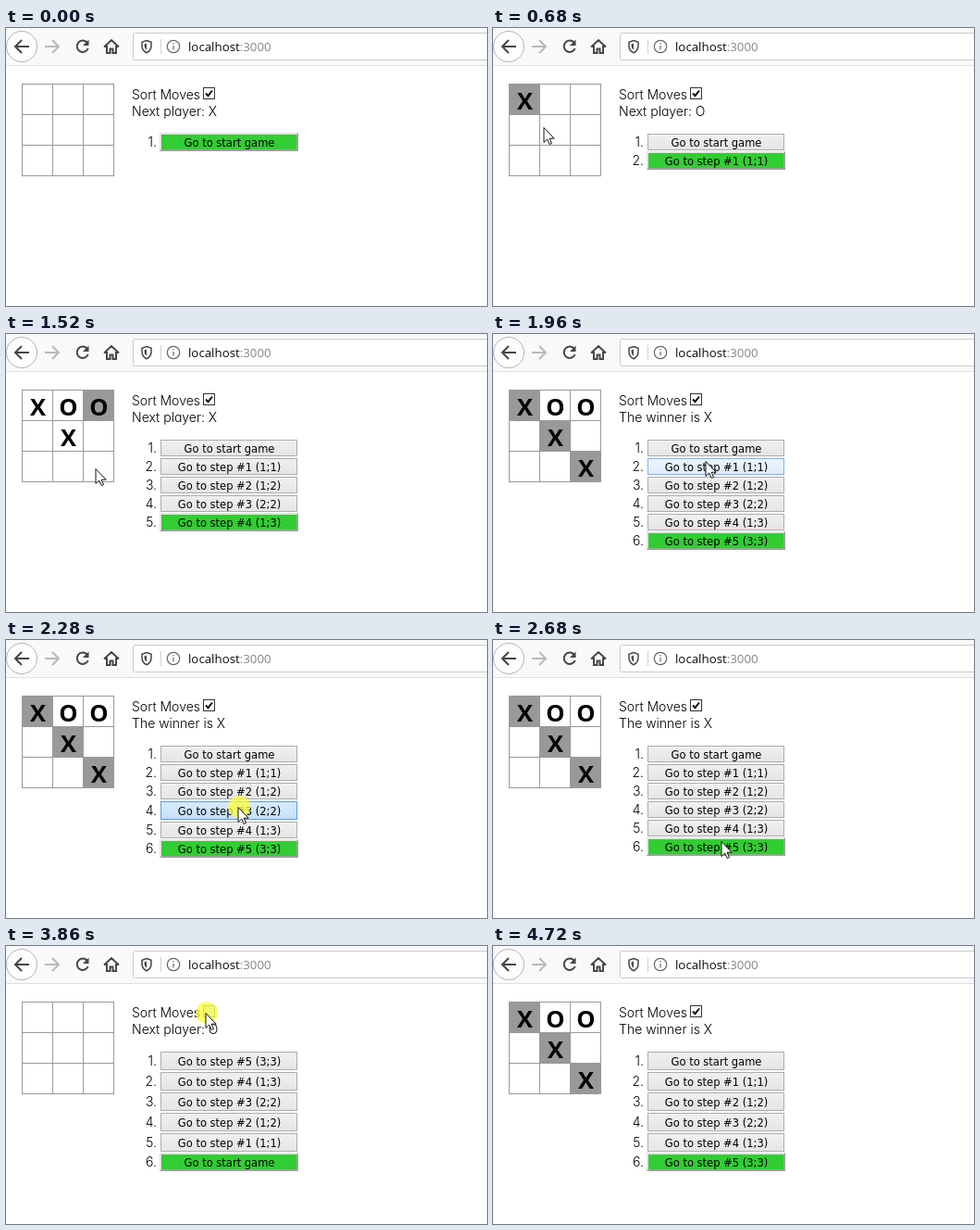
Recreate the animation shown at these times as an HTML page. Size 520 by 300 pixels, loop 4760 ms.

```html
<!DOCTYPE html>
<html lang="en">
<head>
<meta charset="utf-8">
<title>Tic-tac-toe</title>
<style>
  html, body { margin: 0; width: 100%; height: 100%; overflow: hidden; background: #fff; }
  svg { display: block; width: 520px; height: 300px; }
  .url { font: 13.3px "Open Sans", sans-serif; }
  .label { font: 300 14px Inter, sans-serif; font-feature-settings: "cv11"; }
  .button { font: 11.5px "DejaVu Sans", sans-serif; text-anchor: middle; }
  .mark { font: bold 25.5px "Open Sans", sans-serif; text-anchor: middle; }
  .icon { fill: none; stroke: #45454a; stroke-width: 2; }
  .icon .solid { fill: #45454a; stroke: none; }
  .icon .thin { stroke: #66666a; stroke-width: 1.2; }
</style>
</head>
<body>
<svg viewBox="0 0 520 300">
  <defs>
    <linearGradient id="plain" x2="0" y2="1"><stop stop-color="#f0f0f0"/><stop offset="1" stop-color="#e5e5e5"/></linearGradient>
    <linearGradient id="hover" x2="0" y2="1"><stop stop-color="#ecf4fc"/><stop offset="1" stop-color="#dcecfc"/></linearGradient>
    <linearGradient id="press" x2="0" y2="1"><stop stop-color="#daecfc"/><stop offset="1" stop-color="#c4e0fc"/></linearGradient>
  </defs>

  <rect width="520" height="40" fill="#f9f9fa"/>
  <path d="M0 40.5H520" stroke="#e0e0e2"/>
  <circle cx="17" cy="20" r="16.5" fill="#fdfdfd" stroke="#b4b4b7"/>
  <g class="icon">
    <path d="M25 20H10.5M17 13L10 20L17 27"/>
    <path d="M42 20H56.5M50 13L57 20L50 27" stroke="#b9b9bc"/>
    <path d="M87.5 15.5A6.2 6.2 0 1 0 88.7 22"/>
    <path class="solid" d="M89.5 12.5V19H83Z"/>
    <path d="M106 20.5L114 13L122 20.5M109 19V27H112.5V22.5H115.5V27H119V19"/>
  </g>
  <rect x="137.5" y="5.500" width="390" height="29" rx="2" fill="#fff" stroke="#cacacd"/>
  <g class="icon">
    <path d="M152 13.5L157 15.2V19C157 23 155 25.3 152 26.7C149 25.3 147 23 147 19V15.2Z" stroke-width="1.5"/>
    <path class="solid" d="M152 16.5V23.5C150 22.2 149.5 20.5 149.5 17.4Z"/>
    <path d="M167.5 12V28" style="stroke:#d0d0d3;stroke-width:1"/>
    <circle class="thin" cx="181" cy="20" r="6.7"/>
    <path class="thin" d="M181 19V23.5M181 16V17.5"/>
  </g>
  <text class="url" x="197" y="25" fill="#0c0c0d">localhost<tspan fill="#858588">:3000</tspan></text>

  <g id="page"></g>
  <g id="pointer">
    <circle id="halo" cx="1" r="12" fill="#ffff30" opacity=".72"/>
    <path d="M0 .5V16.5L3.7 13L6.2 18.5L8.500 17.5L6.1 12.2H11.2Z" fill="#fff" stroke="#111"/>
  </g>
</svg>

<script>
const LOOP = 4760, TICK = 20;
const HALO = 70, REACTION = 40;       // ms after a click begins
const CELL = 33, BOARD = { x: 17, y: 60 }, LIST_Y = 113;
const BOX = { x: 213, y: 64, size: 13 };

// Where the pointer goes, when it gets there and when it clicks.
// bow bends the way vertically.
const STOPS = [
  { arrive: 40, travel: 0, x: 353, y: 273 },
  { arrive: 380, travel: 340, click: 440, x: 28, y: 80, bow: -20 },
  { arrive: 800, travel: 220, click: 860, x: 66, y: 85, bow: 28 },
  { arrive: 1060, travel: 140, click: 1120, x: 66, y: 115 },
  { arrive: 1320, travel: 140, click: 1360, x: 100, y: 85 },
  { arrive: 1520, travel: 100, click: 1580, x: 97, y: 145 },
  { arrive: 2100, travel: 380, click: 2280, x: 251, y: 180, bow: -82 },
  { arrive: 2460, travel: 120, click: 2520, x: 247, y: 217 },
  { arrive: 3140, travel: 460, click: 3340, x: 216, y: 72, bow: -70 },
  { arrive: 3340, travel: 0, click: 3860, x: 216, y: 72 },
  { arrive: 4440, travel: 260, x: 437, y: 300 }
];
const CLICKS = STOPS.filter(s => s.click);

const page = document.getElementById("page");
const pointer = document.getElementById("pointer");
const halo = document.getElementById("halo");

const text = (cls, x, y, str, extra = "") =>
  `<text class="${cls}" x="${x}" y="${y}" ${extra}>${str}</text>`;
const rect = (x, y, w, h, fill, stroke = "none") =>
  `<rect x="${x}" y="${y}" width="${w}" height="${h}" fill="${fill}" stroke="${stroke}"/>`;
const inside = (p, x, y, w, h) =>
  p && p.x >= x && p.x < x + w && p.y >= y && p.y < y + h;

const onBoard = p => inside(p, BOARD.x, BOARD.y, 3 * CELL, 3 * CELL);
const onBox = p => inside(p, BOX.x, BOX.y, BOX.size, BOX.size);

// Replays all clicks up to t; what a click does follows from its place.
function gameAt(t) {
  const game = { moves: [], step: 0, sorted: true, tall: false };
  for (const c of CLICKS.filter(c => t >= c.click + REACTION)) {
    if (onBoard(c)) {
      const column = Math.floor((c.x - BOARD.x) / CELL);
      const row = Math.floor((c.y - BOARD.y) / CELL);
      game.moves.push(row * 3 + column);
      game.step = game.moves.length;
    } else if (onBox(c)) {
      game.sorted = !game.sorted;
      game.tall = true;
    } else {
      game.step = Math.floor((c.y - LIST_Y) / 20);
    }
  }
  return game;
}

function pointerAt(t) {
  const next = STOPS.findIndex(s => s.arrive > t);
  if (next < 1) return null;
  const a = STOPS[next - 1], b = STOPS[next];
  const u = b.travel ? Math.max(0, 1 - (b.arrive - t) / b.travel) : 0;
  const k = 1 - (1 - u) ** 2;
  return {
    x: a.x + (b.x - a.x) * k,
    y: a.y + (b.y - a.y) * k + (b.bow || 0) * 4 * k * (1 - k)
  };
}

function board(moves) {
  const won = moves.length === 5;
  let out = "";
  for (let cell = 0; cell < 9; cell++) {
    const x = BOARD.x + .5 + cell % 3 * CELL;
    const y = BOARD.y + .5 + Math.floor(cell / 3) * CELL;
    const turn = moves.indexOf(cell);
    const lit = turn >= 0 && (won ? turn % 2 === 0 : turn === moves.length - 1);
    out += rect(x, y, CELL, CELL, lit ? "#999" : "#fff", "#999");
    if (turn >= 0) out += text("mark", x + 17, y + 27.5, turn % 2 ? "O" : "X");
  }
  return out;
}

function checkbox(sorted, hot, down) {
  return rect(BOX.x + .5, BOX.y + .5, 12, 12, down ? "#d9ecff" : "#fff", hot ? "#3c8fe0" : "#333") +
    (sorted ? `<path d="M216 70.5L218.5 73.2L223 67.5" fill="none" stroke="#111" stroke-width="2"/>` : "");
}

function moveLabel(n, moves) {
  if (!n) return "Go to start game";
  const cell = moves[n - 1];
  return `Go to step #${n} (${Math.floor(cell / 3) + 1};${cell % 3 + 1})`;
}

function button(y, h, look) {
  if (look === "current")
    return rect(166, y, 150, 20, "#a0a0a0") +
      `<path d="M166 ${y + 20}V${y}H316L314 ${y + 2}H168V${y + 18}Z" fill="#e3e3e3"/>` +
      rect(168, y + 2, 146, 16, "#32cd32");
  const edge = { plain: "#acacac", hover: "#7eb4ea", press: "#569de5" }[look];
  return rect(167.5, y + 1.5, 147, h - 1, `url(#${look})`, edge);
}

function history({ moves, step, sorted, tall }, p, pressing) {
  let out = "", y = LIST_Y;
  for (let i = 0; i <= moves.length; i++) {
    const hot = inside(p, 167, y + 1, 148, 18);
    const look = i === step ? "current" : !hot ? "plain" : pressing ? "press" : "hover";
    const h = tall || look === "press" ? 20 : 18;
    const base = y + 6 + (look === "current" ? 18 : h) / 2;
    out += button(y, h, look) +
      text("button", 241.5, base, moveLabel(sorted ? i : moves.length - i, moves)) +
      text("label", 163, base, `${i + 1}.`, 'text-anchor="end"');
    y += h + 2;
  }
  return out;
}

function draw(t) {
  const game = gameAt(t), p = pointerAt(t);
  const { moves, step, sorted } = game;
  const clickedWithin = ms => CLICKS.some(c => t >= c.click && t < c.click + ms);
  const shown = moves.slice(0, sorted ? step : moves.length - step);
  const status = shown.length === 5 ? "The winner is X" : `Next player: ${step % 2 ? "O" : "X"}`;
  const clicking = clickedWithin(HALO);

  page.innerHTML = board(shown) + text("label", 136, 77, "Sort Moves") +
    checkbox(sorted, onBox(p), onBox(p) && clicking) +
    text("label", 136, 95, status) +
    history(game, p, clickedWithin(REACTION));

  pointer.style.display = p ? "" : "none";
  halo.style.display = clicking ? "" : "none";
  if (p) pointer.setAttribute("transform", `translate(${Math.round(p.x)} ${Math.round(p.y)})`);
}

const start = performance.now();
let last = -1;
function frame() {
  const t = Math.floor((performance.now() - start) % LOOP / TICK) * TICK;
  if (t !== last) draw(last = t);
  requestAnimationFrame(frame);
}
frame();
</script>
</body>
</html>
```
